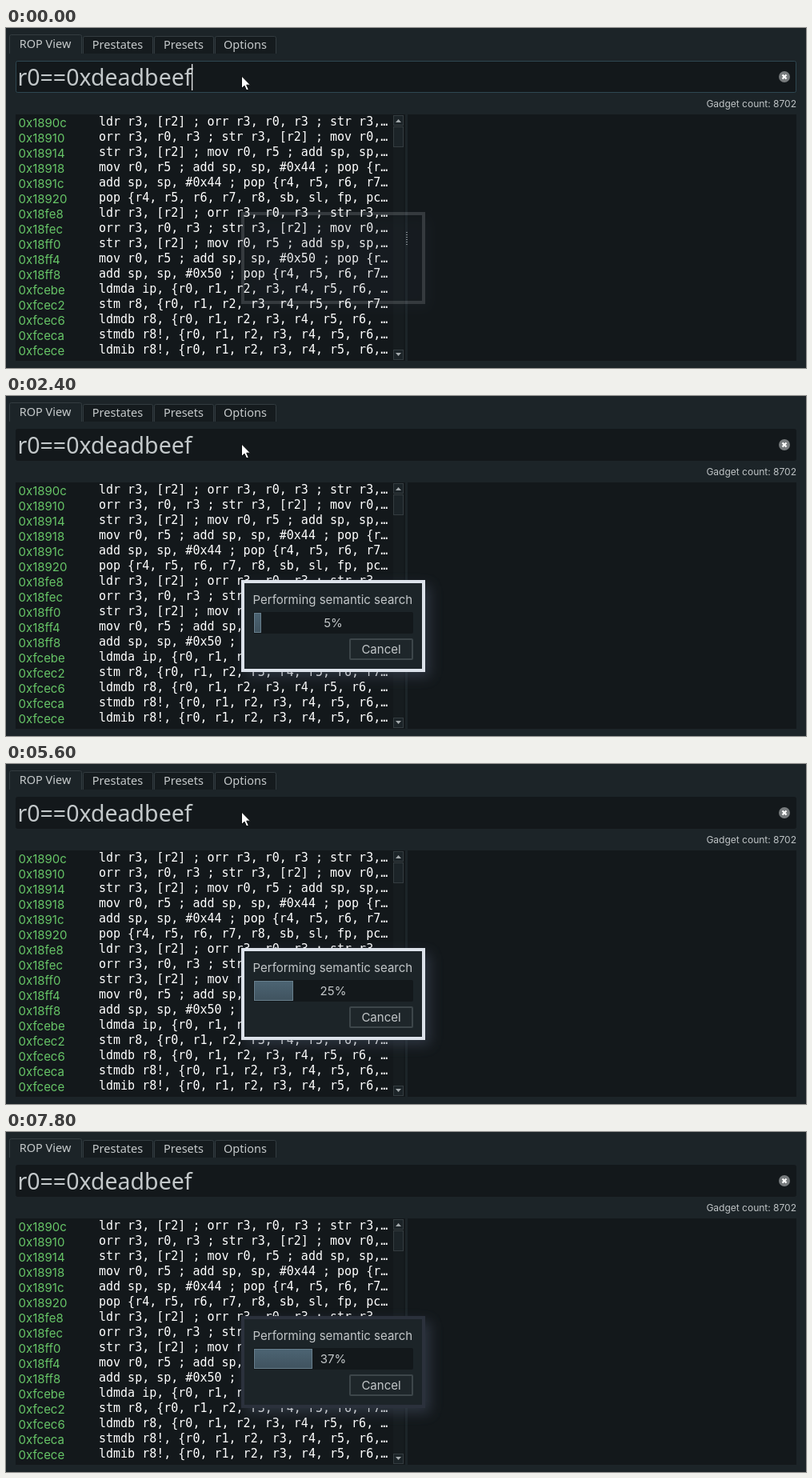
An HTML page for the animation above (8 s loop, 1000x425 px).

```html
<!DOCTYPE html>
<html lang="en">
<head>
<meta charset="utf-8">
<title>Semantic gadget search</title>
<style>
  html, body { margin: 0; width: 100%; height: 100%; overflow: hidden; background: #1c2428; }
  svg { display: block; width: 100%; height: 100%; }
  text { white-space: pre; }
  .ui { font: 15px Inter, sans-serif; fill: #c3c7c9; }
  .small { font: 12px Inter, sans-serif; fill: #bfc4c6; }
  .tab { font: 14.5px "Noto Sans", sans-serif; fill: #c6cacb; }
  .query { font: 28.5px "Noto Sans", sans-serif; fill: #c3c8ca; }
  .code { font: 15px "DejaVu Sans Mono", monospace; fill: #fff; }
  .addr { font: 15px Inter, sans-serif; fill: #67c567; }
  .mid { text-anchor: middle; }
  .end { text-anchor: end; }
</style>
</head>
<body>
<svg viewBox="0 0 1000 425">
  <defs>
    <linearGradient id="chunk" x2="0" y2="1">
      <stop stop-color="#4c6473"/><stop offset="1" stop-color="#40535f"/>
    </linearGradient>
    <filter id="blur" x="-20%" y="-30%" width="140%" height="160%">
      <feGaussianBlur stdDeviation="8"/>
    </filter>
    <clipPath id="list"><rect x="12" y="108" width="472" height="307"/></clipPath>
  </defs>

  <rect width="1000" height="425" fill="#1c2428"/>
  <g id="tabs"></g>

  <rect id="input" x="12.5" y="41.5" width="975" height="39" rx="2" fill="#13181b"/>
  <text class="query" x="14.5" y="72">r0==0xdeadbeef</text>
  <rect id="caret" x="232" y="45" width="1.3" height="33" fill="#e8eaeb"/>
  <circle cx="973" cy="61" r="7" fill="#777b7d"/>
  <path d="M970.5 58.5l5 5m0-5l-5 5" stroke="#fff" stroke-width="2.2"/>

  <text id="status" class="small" x="12" y="99" style="fill:#eef0f0">Searching...</text>
  <text class="small end" x="988" y="99">Gadget count: 8702</text>

  <rect x="12" y="108" width="487" height="308" fill="#13181b"/>
  <rect x="502" y="108" width="486" height="308" fill="#13181b"/>
  <g id="rows" clip-path="url(#list)"></g>

  <rect x="484" y="109" width="13" height="306" fill="#161c1f"/>
  <g fill="#1c2428" stroke="#343c40">
    <rect x="484.5" y="109.5" width="12" height="12"/>
    <rect x="484.5" y="123.5" width="12" height="25"/>
    <rect x="484.5" y="402.5" width="12" height="12"/>
  </g>
  <path d="M487 118l3.5-4 3.5 4zM487 406l3.5 4 3.5-4z" fill="#a5abae"/>
  <path d="M501 255v18" stroke="#8b9296" stroke-width="2" stroke-dasharray="1 2"/>

  <g id="dialog">
    <rect x="300" y="237" width="230" height="114" fill="#4a5268" opacity=".48" filter="url(#blur)"/>
    <rect id="frame" x="296" y="232" width="226" height="111" fill="#1c2428" stroke-width="4"/>
    <g id="content">
      <text class="ui" x="308.5" y="260">Performing semantic search</text>
      <rect x="309" y="270" width="200" height="27" rx="2" fill="#13181b"/>
      <rect id="bar" x="310.5" y="271.5" height="24" fill="url(#chunk)" stroke="#687f8d"/>
      <text id="percent" class="ui mid" x="409" y="289"></text>
      <rect x="430" y="304" width="78" height="25" rx="1" fill="#1e262a" stroke="#3d464a" stroke-width="2"/>
      <text class="ui mid" x="469" y="322">Cancel</text>
    </g>
  </g>

  <path id="pointer" d="M0 0V15.5L3.6 12.2 6.2 18 8.8 16.8 6.2 11.2H11Z" fill="#fff" stroke="#0b0d0e"/>
</svg>
<script>
const LOOP = 8000;
const $ = id => document.getElementById(id);
const set = (id, attrs) => {
  for (const name in attrs) $(id).setAttribute(name, attrs[name]);
};
const show = (id, on) => set(id, { visibility: on ? "visible" : "hidden" });

const tabs = [["ROP View", 4, 94], ["Prestates", 96, 183], ["Presets", 185, 259], ["Options", 261, 337]];
$("tabs").innerHTML = tabs.map(([name, left, right], i) => {
  const top = i ? 10.5 : 8.5, fill = i ? "#151b1e" : "#1c2428";
  return `<path d="M${left + .5} 32V${top + 2}q0-2 2-2H${right - 1.5}q2 0 2 2V32"
      fill="${fill}" stroke="#333c40"/>
    <text class="tab mid" x="${(left + right) / 2}" y="${i ? 26 : 25}">${name}</text>`;
}).join("");

const rows = `1890c ldr r3, [r2] ; orr r3, r0, r3 ; str r3,
18910 orr r3, r0, r3 ; str r3, [r2] ; mov r0,
18914 str r3, [r2] ; mov r0, r5 ; add sp, sp,
18918 mov r0, r5 ; add sp, sp, #0x44 ; pop {r
1891c add sp, sp, #0x44 ; pop {r4, r5, r6, r7
18920 pop {r4, r5, r6, r7, r8, sb, sl, fp, pc
18fe8 ldr r3, [r2] ; orr r3, r0, r3 ; str r3,
18fec orr r3, r0, r3 ; str r3, [r2] ; mov r0,
18ff0 str r3, [r2] ; mov r0, r5 ; add sp, sp,
18ff4 mov r0, r5 ; add sp, sp, #0x50 ; pop {r
18ff8 add sp, sp, #0x50 ; pop {r4, r5, r6, r7
fcebe ldmda ip, {r0, r1, r2, r3, r4, r5, r6, 
fcec2 stm r8, {r0, r1, r2, r3, r4, r5, r6, r7
fcec6 ldmdb r8, {r0, r1, r2, r3, r4, r5, r6, 
fceca stmdb r8!, {r0, r1, r2, r3, r4, r5, r6,
fcece ldmib r8!, {r0, r1, r2, r3, r4, r5, r6,`.split("\n");
$("rows").innerHTML = rows.map((row, i) => {
  const y = 122 + i * 19;
  return `<text class="addr" x="15.5" y="${y + 1.5}">0x${row.slice(0, 5)}</text>
    <text class="code" x="116" y="${y}">${row.slice(6)}…</text>`;
}).join("");

// Progress jumps as results come in: [ms, percent].
const progress = [
  [0, 0], [1600, 1], [1900, 2], [2200, 4], [2400, 5], [3300, 8], [3500, 11],
  [3600, 13], [3800, 14], [4000, 15], [4300, 17], [4500, 18], [4700, 20],
  [5000, 21], [5200, 22], [5400, 24], [5600, 25], [5800, 26], [6000, 28],
  [6300, 29], [6600, 31], [6900, 32], [7200, 33], [7400, 35], [7600, 36], [7800, 37]
];
// The pointer rests, then leaves over the top edge: [ms, x, y].
const pointerPath = [[0, 294.5, 60], [6000, 274, 30], [6100, 242, -4], [6200, 220, -30]];
const latest = (steps, t) => steps.filter(step => step[0] <= t).pop();

function draw(t) {
  const open = t >= 100, focused = t < 900;
  set("input", { stroke: focused ? "#2e4751" : "#13181b" });
  show("caret", focused);
  show("status", open && t < 1200);

  set("dialog", { opacity: open ? 1 : .17 });
  set("frame", { stroke: t < 6400 ? "#dce2ea" : "#2b313c", "fill-opacity": open ? 1 : .3 });
  show("content", open);

  const percent = latest(progress, t)[1];
  set("bar", { width: Math.max(.1, 2 * percent - 2) });
  show("bar", t >= 1200);
  $("percent").textContent = percent + "%";

  const [, x, y] = latest(pointerPath, t);
  set("pointer", { transform: `translate(${x} ${y})` });
}

const start = performance.now();
function tick() {
  draw((performance.now() - start) % LOOP);
  requestAnimationFrame(tick);
}
tick();
</script>
</body>
</html>
```
